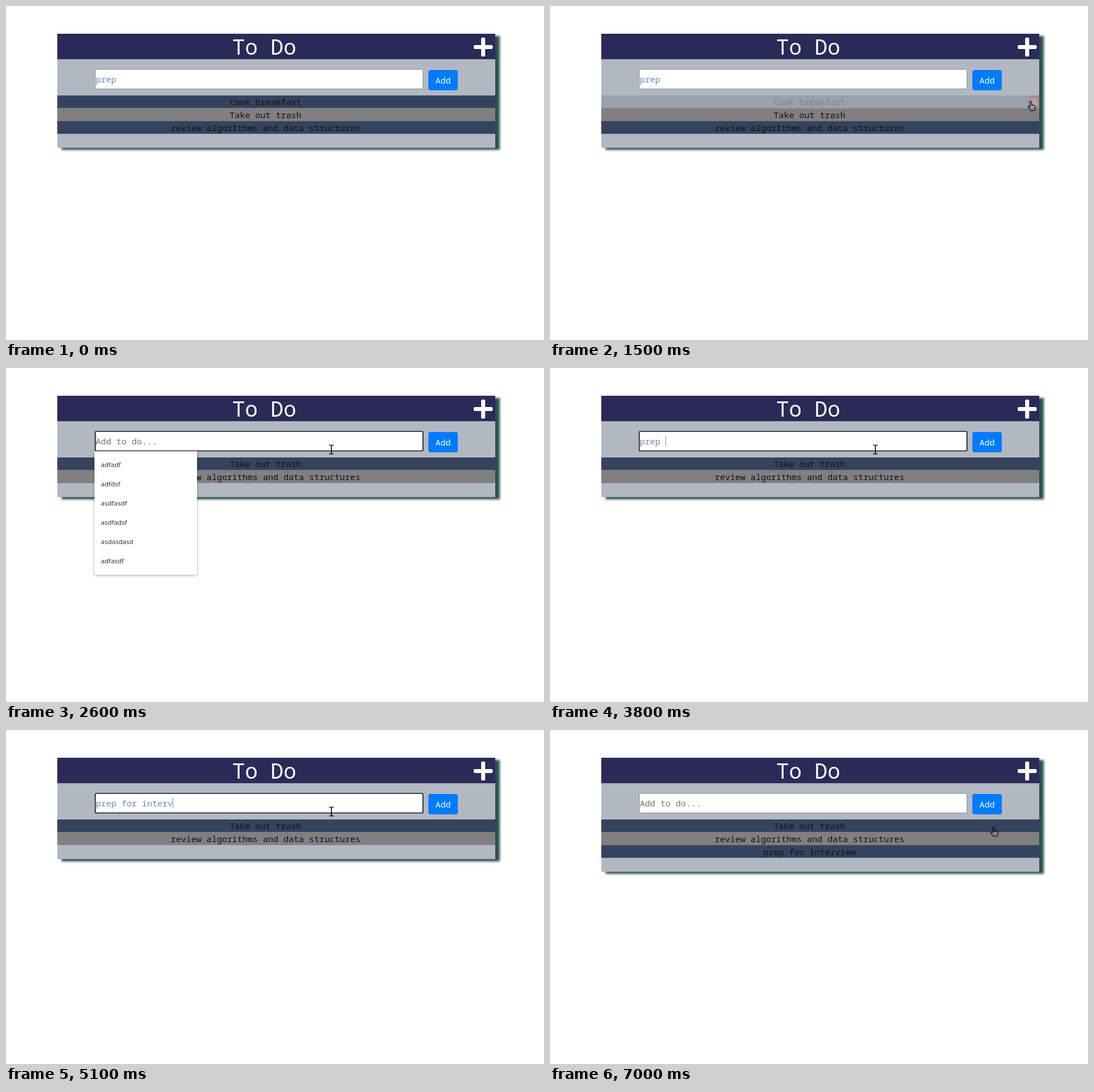
Recreate the animation shown at these times as an HTML page with a canvas. Size 949 by 590 pixels, loop 7100 ms.

```html
<!DOCTYPE html>
<html lang="en">
<head>
<meta charset="utf-8">
<title>To Do</title>
<style>
html, body { margin: 0; width: 100%; height: 100%; overflow: hidden; background: #fefefe; }
canvas { display: block; }
</style>
</head>
<body>
<canvas id="stage" width="949" height="590"></canvas>
<script>
const ctx = document.getElementById('stage').getContext('2d');
const LOOP = 7100, STEP = 100;
const LEFT = 90.5, RIGHT = 863, LIST_TOP = 158, ROW = 22.6, CHAR = 9.042;
const REMOVE = 1600, FOCUS = 2400, TYPE = 3400, SUBMIT = 6200;
const MONO = '"Roboto Mono", "Noto Sans Mono", monospace';
const NEW_ITEM = 'prep for interview';
const ITEMS = ['Cook breakfast', 'Take out trash', 'review algorithms and data structures'];
const SUGGESTIONS = ['adfadf', 'adfdsf', 'asdfasdf', 'asdfadsf', 'asdasdasd', 'adfasdf'];

// pointer hotspot: time, x, y
const PATH = [
  [0, 29, 588], [50, 29, 588], [400, 595, 345], [600, 800, 224], [760, 840, 203],
  [900, 842, 194], [1100, 848, 168], [1600, 848, 168], [1700, 775, 161], [1800, 649, 152.5],
  [2100, 574, 144], [5600, 574, 144], [6000, 768, 138], [6400, 768, 138],
  [6800, 769, 157], [6900, 769, 157], [7000, 782, 171]
];

// delete buttons: row, pointer enters, pointer leaves, opacity
const HOVERS = [[2, 600, 870, .4], [1, 720, 920, 1], [0, 950, 1600, 1]];

const TRASH = new Path2D('M0 2.5H4L5 1H9L10 2.5H14V4.5H0ZM1 5.5H13L12.3 16.5H1.7Z');
const ARROW = new Path2D('M0 0V15L3.5 11.7 5.8 17 8 16 5.7 10.9H10.5Z');
const BEAM = new Path2D('M-4-8Q-1-8 0-6.8Q1-8 4-8M0-7V7M-4 8Q-1 8 0 6.8Q1 8 4 8');
const HAND = new Path2D('M-1.5 10V1.5a1.5 1.5 0 0 1 3 0V7c.8-1 2-.7 2.5.4 1-.6 2-.3 2.4.7 1.2-.4 1.9.3 1.9 1.3V11.5c0 2-1 3-1.3 5.3H-.5C-1 14.5-4 12.5-4.8 10c0-1.5 1.6-1.6 3.3.6');

const clamp = v => Math.max(0, Math.min(1, v));

function rect(x, y, w, h, fill, radius = 0, stroke, line = 1) {
  ctx.beginPath();
  ctx.roundRect(x, y, w, h, radius);
  ctx.fillStyle = fill;
  ctx.fill();
  if (stroke) {
    ctx.strokeStyle = stroke;
    ctx.lineWidth = line;
    ctx.stroke();
  }
}

function text(str, x, y, color, align = 'left', font = `15.07px ${MONO}`) {
  ctx.font = font;
  ctx.textAlign = align;
  ctx.fillStyle = color;
  ctx.fillText(str, x, y);
}

function withShadow(color, dx, dy, blur, draw) {
  ctx.save();
  Object.assign(ctx, { shadowColor: color, shadowOffsetX: dx, shadowOffsetY: dy, shadowBlur: blur });
  draw();
  ctx.restore();
}

function drawCard(rows) {
  const bottom = LIST_TOP + ROW * rows + 24.7;
  withShadow('#2b4d50', 7.5, 3.8, 4, () => rect(LEFT, 49, RIGHT - LEFT, bottom - 49, '#b2b8c1'));
  rect(LEFT, 49, RIGHT - LEFT, 45, '#2b2a58');
  text('To Do', 455.5, 86, '#fff', 'center', `37.7px ${MONO}`);
  rect(825, 69, 33.5, 7, '#fff', 2);
  rect(838.2, 55.8, 7, 33.4, '#fff', 2);
  rect(745, 113, 52, 36, '#007bff', 4);
  text('Add', 771, 137, '#fff', 'center');
}

function drawInput(t) {
  const focused = t >= FOCUS && t < SUBMIT - 100;
  rect(157.5, 112, 578, 34.5, '#fff', 2, focused ? '#15171a' : '#858a91', focused ? 1.7 : 1);
  let value = '';
  if (t < REMOVE) value = 'prep';
  else if (t >= TYPE && t < SUBMIT) {
    const count = t <= 3800 ? (t - TYPE) / 100 + 1 : 5 + (t - 3800) / 130;
    value = NEW_ITEM.slice(0, Math.floor(count));
  }
  text(value || 'Add to do...', 158.5, 135, value ? '#7187a9' : '#767676');
  if (focused) rect(158.3 + CHAR * value.length, 120, 1, 18, '#7b8798');
}

function drawRows(items, t) {
  items.forEach((item, i) => {
    const y = LIST_TOP + ROW * i;
    ctx.globalAlpha = i === 0 && t < REMOVE ? clamp((REMOVE - t) / 500) : 1;
    rect(LEFT, y, RIGHT - LEFT, ROW, i % 2 ? '#827f80' : '#35435e');
    text(item, 457.8, y + 17.3, '#0e1118', 'center');
  });
  ctx.globalAlpha = 1;
}

function drawTrash(t) {
  for (const [row, enter, leave, peak] of HOVERS) {
    if (t <= enter || t >= leave + 400) continue;
    const rise = clamp((t - enter) / 200), gone = clamp((t - leave) / 400);
    const width = 18 * rise * clamp(1 - 2 * gone);
    const fade = row === 0 && t < REMOVE ? clamp((REMOVE - t) / 500) : 1;
    const y = LIST_TOP + ROW * row;
    ctx.save();
    ctx.globalAlpha = peak * rise * (1 - gone * gone) * fade;
    rect(RIGHT - width, y, width, ROW, '#e3362c');
    ctx.translate(RIGHT - width + Math.max(0, (width - 14) / 2), y + 3);
    ctx.fillStyle = '#fff';
    ctx.fill(TRASH);
    ctx.restore();
  }
}

function drawSuggestions() {
  withShadow('rgba(0,0,0,.35)', 0, 1, 4, () => rect(156, 147, 181, 218.5, '#fff', [0, 0, 3, 3]));
  SUGGESTIONS.forEach((s, i) =>
    text(s, 167.5, 175 + 33.9 * i, '#2e3238', 'left', '500 11.5px "Noto Sans", sans-serif'));
}

function pointerAt(t) {
  const i = PATH.findIndex(p => p[0] > t);
  if (i < 0) return PATH.at(-1).slice(1);
  const [t0, x0, y0] = PATH[i - 1], [t1, x1, y1] = PATH[i];
  const k = (t - t0) / (t1 - t0);
  return [x0 + (x1 - x0) * k, y0 + (y1 - y0) * k];
}

function drawPointer(t, rows) {
  const [x, y] = pointerAt(t);
  const inside = (l, r, top, bottom) => x > l && x < r && y > top && y < bottom;
  ctx.save();
  ctx.translate(x, y);
  ctx.lineJoin = 'round';
  ctx.strokeStyle = '#0b0d12';
  if (inside(157, 736, 111, 153)) {
    ctx.lineWidth = 1.7;
    ctx.stroke(BEAM);
  } else if (inside(LEFT, RIGHT, LIST_TOP, LIST_TOP + ROW * rows) || inside(745, 797, 113, 149)) {
    ctx.lineWidth = 1.2;
    ctx.stroke(HAND);
  } else {
    ctx.strokeStyle = '#fff';
    ctx.lineWidth = 1;
    ctx.fillStyle = '#0b0d12';
    ctx.fill(ARROW);
    ctx.stroke(ARROW);
  }
  ctx.restore();
}

function draw(t) {
  const items = t < REMOVE ? ITEMS : ITEMS.slice(1);
  if (t >= SUBMIT) items.push(NEW_ITEM);
  ctx.fillStyle = '#fefefe';
  ctx.fillRect(0, 0, 949, 590);
  drawCard(items.length);
  drawInput(t);
  drawRows(items, t);
  drawTrash(t);
  if (t >= FOCUS && t < TYPE) drawSuggestions();
  drawPointer(t, items.length);
}

const start = performance.now();
function tick() {
  const t = (performance.now() - start) % LOOP;
  draw(Math.floor(t / STEP) * STEP);
  requestAnimationFrame(tick);
}
tick();
</script>
</body>
</html>
```
